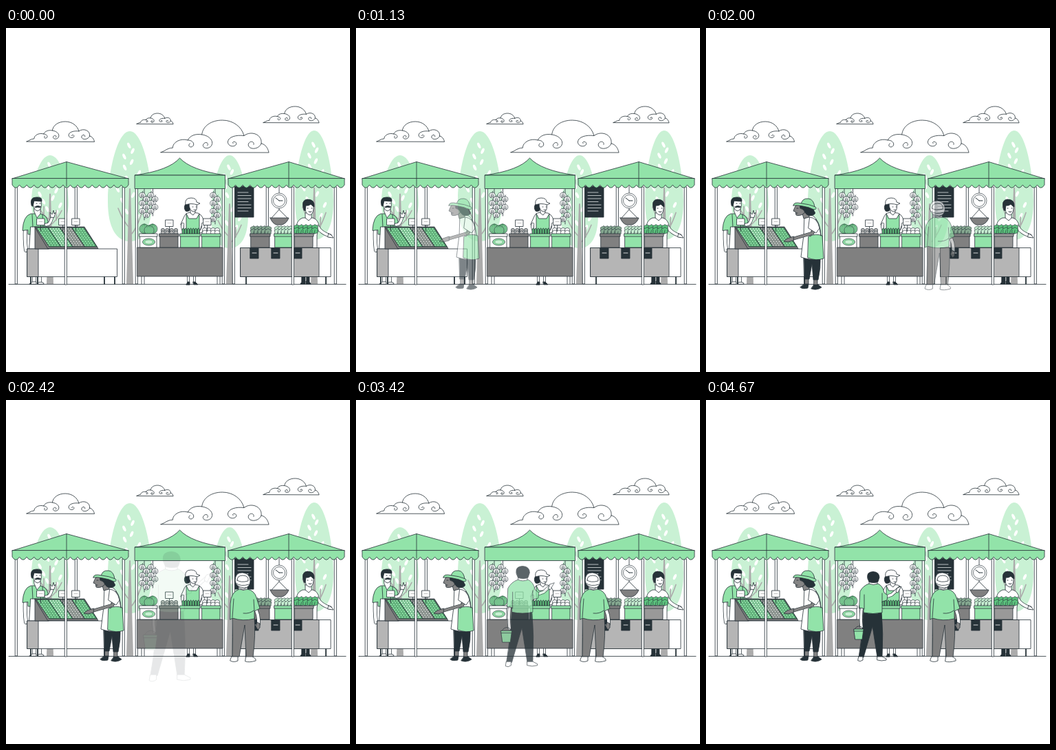
An HTML page that plays this animation: 500x500 px, repeating every 4.71 s.

```html
<!DOCTYPE html>
<html lang="en">
<head>
<meta charset="utf-8">
<title>Farmers market</title>
<style>
html, body { margin: 0; height: 100%; overflow: hidden; background: #fff; }
svg { display: block; width: 100vw; height: 100vh; }
path, ellipse { vector-effect: non-scaling-stroke; }
</style>
</head>
<body>
<svg id="stage" viewBox="0 0 500 500"></svg>
<script>
const INK = '#263238', GREEN = '#92e3a9', PALE = '#c9f1d4', GRAY = '#808080', MID = '#b5b5b5', WHITE = '#fff';
const LOOP = 4710;

const each = (n, f) => Array.from({ length: n }, (_, i) => f(i)).join('');

const path = (d, fill = 'none', stroke = INK, w = .8) =>
  `<path d="${d}" fill="${fill}" stroke="${stroke}" stroke-width="${w}" stroke-linejoin="round" stroke-linecap="round"/>`;
const rect = (x, y, w, h, fill = WHITE, stroke = INK) => path(`M${x} ${y}h${w}v${h}h${-w}z`, fill, stroke);
const oval = (x, y, rx, ry = rx, fill = WHITE, stroke = INK, turn = 0) =>
  `<ellipse cx="${x}" cy="${y}" rx="${rx}" ry="${ry}" fill="${fill}" stroke="${stroke}" stroke-width=".65" transform="rotate(${turn} ${x} ${y})"/>`;
const limb = (d, w, fill) => path(d, 'none', INK, w + 1.4) + path(d, 'none', fill, w);
const group = (body, attrs) => `<g ${attrs}>${body}</g>`;

function cloud(x, y, sx, sy = sx) {
  return group(path(`M0 29C4 28 6 25 11 25C11 20 18 16 25 18C27 14 32 12 38 13C39 5 47 0 57 0
    C67 0 75 6 77 14C84 9 94 13 93 21C97 22 99 25 100 29Z`, WHITE) +
    path(`M25 18C30 18 32 22 29 24C26 25 25 22 27 21M38 13C46 14 50 20 46 24C42 27 37 24 40 21C42 19 45 21 43 23
    M77 14C70 13 62 15 62 20C63 25 70 24 70 21C69 18 65 20 67 21M93 21C91 27 81 27 81 22C82 18 87 19 86 22`),
    `transform="translate(${x} ${y}) scale(${sx} ${sy})"`);
}

function tree(x, top, bottom, w) {
  const h = bottom - top, y = f => top + h * f;
  const half = s => `C${x + s * .6 * w} ${top} ${x + s * w} ${y(.4)} ${x + s * w} ${y(.64)}C${x + s * w} ${y(.88)} ${x + s * .6 * w} ${bottom} ${x} ${bottom}`;
  const crown = path(`M${x} ${top}${half(1)}M${x} ${top}${half(-1)}`, PALE, 'none');
  const leaves = each(14, i => {
    const f = .13 + i * .05, side = i % 2 ? 1 : -1;
    return oval(x + side * w * (.15 + (i % 3) * .2) * Math.min(1, f * 2), y(f), 2, 4.5, WHITE, 'none', side * 25);
  });
  const trunk = path(`M${x - 5} 372L${x - 1} ${y(.52)}h2L${x + 5} 372z`, '#ababab', 'none') +
    path(`M${x} ${y(.88)}Q${x - 9} ${y(.83)} ${x - 17} ${y(.7)}M${x - 9} ${y(.81)}v-12M${x} ${y(.95)}Q${x + 9} ${y(.9)} ${x + 17} ${y(.75)}M${x + 9} ${y(.88)}v-14`, 'none', '#ababab', 1.6);
  return crown + leaves + trunk;
}

const pole = (x, top, bottom) => rect(x - 1.4, top, 2.8, bottom - top);

function sideRoof(x0, x1, apex) {
  const n = 16, w = (x1 - x0) / n;
  return path(`M${x0} 219L${apex} 194.5L${x1} 219z`, GREEN) +
    path(`M${x0} 219V228${each(n, () => `q${w / 2} 8.5 ${w} 0`)}V219z`, GREEN) + path(`M${apex} 194.5V230`);
}

const sign = (x, y) => path(`M${x + 5.5} ${y + 9}v9`) + rect(x, y, 11, 9.5) + path(`M${x + 3} ${y + 4.5}h5`, 'none', '#999', .6);

const crate = (x, w, fill) => rect(x, 302, w, 17, fill) + rect(x - 1, 299, w + 2, 4, fill);

const fruits = (x, w, fill, r) => each(8, i => oval(x + 4 + (i % 4) * (w - 8) / 3, i < 4 ? 294 : 297.5, r, r, fill));

const lettuce = (x, w, fill, top) => each(10, i => {
  const a = x + 3 + (i % 5) * (w - 6) / 4, b = top + (i > 4 ? 4 : 0);
  return path(`M${a} ${b + 4}q-5-1-3-4q-2-4 2-4q2-3 4 0q4 0 2 4q2 3-5 4zM${a} ${b + 3}l1-4`, fill, INK, .6);
});

const garlic = (x, y, n) => path(`M${x} 233V${y + n * 6}`) + each(n, i => {
  const a = x + (i % 2 ? 3 : -3), b = y + i * 5.8;
  return oval(a, b, 4.3, 3.8) + oval(a, b, 1.8, 1.6) + path(`M${a} ${b - 3.8}l1-2M${a - 2} ${b + 3}l1-2M${a + 2} ${b + 3}l-1-2`);
});

function leftVendor() {
  return limb('M41 361V370M49 361V370', 4, WHITE) + path('M34 372q2-4 10-3v3zM46 372q0-4 8-2l1 2z', WHITE) +
    limb('M28 292Q27 306 29 323', 4.5, WHITE) +
    path('M24 294Q25 273 36 270L50 270Q59 272 61 281L59 290V300H32V294z', GREEN) +
    path('M36 289H57L59 322H34zM38 271L39 289M53 271L54 289', WHITE) + path('M41 267L45 276L50 270V262H41z', WHITE) +
    limb('M58 286Q64 287 67 275', 3.5, WHITE) +
    path('M65 275L64 268L67 271L69 265L70 270L72 268L70 275z', WHITE) +
    path('M39 251H51Q53 264 46 266Q39 265 39 251z', WHITE) +
    path('M37 258Q34 246 44 246Q53 245 52 252Q46 252 41 251L39 259z', INK) +
    path('M42 260Q46 257 51 260L49 261Q46 260 43 261z', INK) + path('M44 255h1M49 255h1', 'none', INK, 1.1);
}

function leftStall() {
  const rows = [['#4f9c69', GREEN], ['#5cae77', PALE], ['#727b76', '#c2c8c4'], ['#4f9c69', GREEN]];
  const produce = rows.map(([base, top], k) => {
    const x = 44 + k * 17.3;
    return path(`M${x} 290h17.3l19 28h-17.3z`, base) + each(40, i =>
      oval(x + 3.5 + i % 4 * 4 + (i >> 2) * 1.75, 292 + (i >> 2) * 2.6, 1.6, 1, top, 'none'));
  }).join('');
  return path('M36 361V372M46 361V372M143 361V372M158 361V372', 'none', INK, 1.8) +
    rect(31, 321, 130.5, 40.5) + rect(31, 321, 16, 40.5, MID) +
    path('M42 289V321H62z', GRAY) + path('M42 289H114L134 320.5H61z', GRAY) + produce +
    sign(45, 277) + sign(77, 277) + sign(96, 277);
}

function middleVendor() {
  return limb('M265 361V369M274 361V369', 2.5, WHITE) + path('M262 373l2-4h3v4zM272 369h3l4 4h-6z', INK) +
    path('M260 272Q263 268 269 268L279 269Q287 272 288 285L284 288L281 299H259L258 288L254 286z', WHITE) +
    path('M262 270V299H281V270L277 277H266z', GREEN) +
    limb('M257 285Q255 291 260 297M286 285Q288 290 283 296', 3, WHITE) +
    path('M262 255Q257 260 261 266Q267 268 268 262L275 256z', INK) +
    path('M266 255H277Q279 266 273 267Q266 266 266 255zM268 265v4l4 3 3-4v-2', WHITE) +
    path('M261 257Q259 247 269 247Q277 247 277 253L282 255L278 257Q269 254 261 257z', WHITE) +
    path('M271 260h1M276 260h1M273 264q2 1 3 0', 'none', INK, .8);
}

function middleStall() {
  const melon = (x, y) => oval(x, y, 7, 7, GREEN) + each(3, i => oval(x, y, 1 + i * 2, 7, 'none', '#3f7f55'));
  return path('M197 361V372M201 361V372M307 361V372M311 361V372') +
    rect(191, 319, 124, 42, GRAY) + melon(201, 292) + melon(213, 292) + melon(208, 294) +
    crate(195, 24, WHITE) + oval(207.5, 311, 9, 5, GREEN) + oval(207.5, 311, 6, 3, PALE, '#5d9c71') +
    fruits(224, 27, MID, 2.7) + crate(224, 26, GRAY) + sign(232, 279) +
    each(7, i => path(`M${256 + i * 3.7} 300v-7q1.5-4 3 0v7z`, '#5cbc79')) + crate(254, 27, GREEN) +
    fruits(285, 26, WHITE, 3.6) + crate(285, 26, GREEN) + sign(287, 277);
}

function rightVendor() {
  return path('M428 372q1-4 7-4v4zM436 372v-4q6 0 7 4zM430 361h5v8h-5zM437 361h4v8h-4z', INK) +
    path('M421 293Q422 279 431 276H446Q453 278 455 287L452 301V320H427V300z', WHITE) +
    limb('M453 289Q458 298 471 302', 4, WHITE) + path('M469 299l4 2 3 4-8-1z', WHITE) +
    path('M435 269v7l5 4 4-4v-6z', WHITE) + path('M434 256H447Q448 270 442 272Q434 271 434 256z', WHITE) +
    path('M433 265Q428 250 438 249Q449 249 448 260Q445 259 443 256Q440 259 436 258L435 265z', INK) +
    path('M438 262h1M444 262h1M440 267q2 1 4 0', 'none', INK, 1);
}

function rightStall() {
  const tag = x => rect(x, 320, 12, 15, INK) + path(`M${x + 3} 327h6`, 'none', WHITE, .8);
  return path('M349 361V372M465 361V372', 'none', INK, 1.8) +
    rect(341, 319.5, 131, 42) + rect(341, 319.5, 114, 42, MID) +
    lettuce(356, 27, '#86a991', 293) + crate(356, 27, GRAY) +
    lettuce(391, 25, PALE, 293) + crate(391, 25, GREEN) +
    lettuce(419, 32, '#5cc27d', 291) + crate(420, 26, '#999') +
    tag(355) + tag(386) + tag(418);
}

function boardAndScale() {
  return rect(333, 230, 27, 45, INK) +
    each(7, i => path(`M337 ${239 + i * 4.5}h${i % 3 ? 19 : 15}`, 'none', '#dfe4e5', .8)) +
    path('M397 230V264L386 276M397 264L409 276') + oval(397, 251, 11) + oval(397, 251, 8.5) +
    path('M397 251l-5-4M397 251h5', 'none', INK, 1) +
    path('M384 276H411Q408 284 401 286H393Q387 284 384 276z', GRAY);
}

function scenery() {
  return cloud(30, 136, .985, 1) + cloud(190, 124, .53) + cloud(225, 134, 1.57, 1.61) + cloud(374, 114, .81) +
    tree(64, 185, 292, 27) + tree(180, 150, 310, 32) + tree(325, 185, 320, 27) + tree(448, 149, 308, 28) +
    path('M4 372.5H494') +
    pole(102, 231, 290) + pole(15, 231, 372) + pole(171, 231, 372) +
    leftVendor() + leftStall() + pole(87, 231, 373) + sideRoof(9, 178, 88) +
    pole(190, 233, 372) + pole(316, 233, 372) + garlic(201, 243, 6) + garlic(213.5, 243, 5) + garlic(304, 243, 7) +
    middleVendor() + middleStall() +
    path('M187.5 214Q237 207 252.5 189Q269 207 318.5 214z', GREEN) + rect(187.5, 214, 131, 19.5, GREEN) +
    pole(331, 231, 372) + pole(380, 231, 300) + pole(479, 231, 372) + boardAndScale() +
    rightVendor() + rightStall() + pole(417, 231, 373) + sideRoof(323, 492, 411);
}

function hatWoman() {
  const skin = '#858585';
  return path('M144 362h5v11h-5zM157 362h5v12h-5z', skin) +
    path('M142 330H166Q167 349 163 366H156L154 343L150 365H143z', INK) +
    path('M143 372h6l-1 6q-8 2-11-1zM157 373h6l5 4q-7 5-15 2z', INK) +
    path('M143 277Q149 271 156 273Q164 280 167 302L164 336Q152 338 138 333L142 301z', WHITE) +
    path('M139 266L142 277L150 275L148 264z', skin) +
    path('M149 303Q160 298 169 302L171 335Q160 339 148 334z', GREEN) + path('M152 303Q154 280 160 278M167 302Q166 284 160 278') +
    limb('M158 289L155 298L124 307', 3.5, skin) + path('M127 303L118 306L113 310L119 311L127 309z', skin) +
    path('M151 275Q162 276 165 291L160 298L149 291z', WHITE) +
    path('M131 257Q128 262 127 266L130 267L131 272Q137 274 143 269L145 258z', skin) +
    path('M137 258Q145 256 152 260Q157 262 157 266Q161 270 155 272Q147 274 144 268Q142 263 137 262z', INK) +
    path('M132 262h2M131 269h2', 'none', INK, .9) +
    path('M138 257Q139 247 149 248Q157 249 158 261z', GREEN) +
    path('M127 258Q127 252 139 255Q150 256 159 260Q162 263 157 264Q149 260 141 259Q133 257 127 258z', GREEN);
}

function beanieShopper() {
  return path('M329 315H361Q363 341 359 374H349L347 327L339 373H329Q330 345 329 315z', GRAY) +
    path('M328 373h9v6q-6 3-11 0zM349 373h9q6 3 5 6q-10 3-15 1z', WHITE) +
    limb('M361 301Q368 311 367 326', 4, WHITE) + path('M365 323l4 2v6l-3 3-3-5z', GRAY) +
    path('M338 269V278H351V269z', WHITE) +
    path('M326 296Q327 279 339 275Q345 278 351 275Q361 277 364 287L369 303L361 307V318Q344 322 329 317L326 319z', GREEN) +
    path('M331 289L329 316M360 290L361 307M345 310Q354 311 360 306') +
    path('M336 266Q337 275 345 275Q352 274 353 266z', WHITE) +
    path('M333 263Q333 250 344 251Q355 252 355 264Q354 273 346 273Q334 272 333 263z', WHITE) +
    path('M334 266Q341 272 353 268M336 262Q341 266 352 263Q353 255 344 255Q336 255 336 262z');
}

function pointingMan() {
  return path('M229 307H255Q258 340 256 374H249L242 329L229 374H222Q228 340 229 307z', INK) +
    path('M222 373h6v5q-4 3-7 1zM249 373h7l6 3v2q-7 2-13 0z', WHITE) +
    limb('M256 288L270 283L279 275', 3.5, WHITE) + path('M276 278L278 273L284 271L281 276L279 280z', WHITE) +
    limb('M227 298Q224 315 226 330', 3.5, WHITE) +
    path('M237 263V270H249V264z', WHITE) +
    path('M224 278Q228 270 237 267Q243 270 250 267Q257 270 259 280L264 284L263 291L256 293V309Q243 312 229 309V303L223 302z', GREEN) +
    path('M230 283V304M256 281V294') +
    path('M236 257Q234 254 235 260L238 265H249L251 256z', WHITE) +
    path('M235 258Q233 250 243 249.5Q252 250 252 258L250 264Q244 267 237 264z', INK) +
    path('M215 333H229L227 348H217z', GREEN) + path('M216 333Q222 324 229 333M215 336h14');
}

const shoppers = [
  { draw: hatWoman, start: 0, span: 2000, move: q => `translate(${20 * q} 0)` },
  { draw: beanieShopper, start: 1450, span: 950, move: q => `translate(${-20 * q} 0)` },
  { draw: pointingMan, start: 2000, span: 2100, move: q => `translate(249 314.5) scale(${1 + .5 * q}) translate(-249 -314.5)` }
];

const stage = document.getElementById('stage');
stage.innerHTML = scenery() + shoppers.map(s => group(s.draw(), 'class="shopper" opacity="0"')).join('');
const figures = stage.querySelectorAll('.shopper');

function frame() {
  const t = performance.now() % LOOP;
  shoppers.forEach((s, i) => {
    const x = Math.min(1, Math.max(0, (t - s.start) / s.span));
    const p = x * x * (3 - 2 * x);
    figures[i].setAttribute('opacity', p < .03 ? 0 : p);
    figures[i].setAttribute('transform', s.move(1 - p));
  });
  requestAnimationFrame(frame);
}
frame();
</script>
</body>
</html>
```
